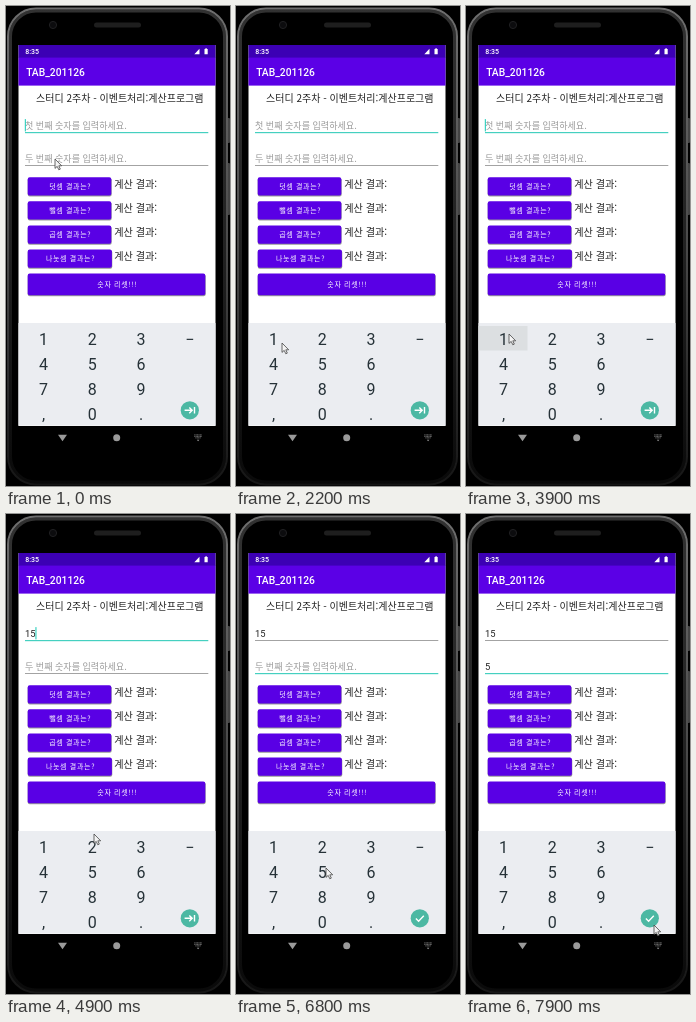
Recreate the animation shown at these times as an HTML page. Size 224 by 480 pixels, loop 8000 ms.

```html
<!DOCTYPE html>
<html lang="ko">
<head>
<meta charset="utf-8">
<title>Calculator demo</title>
<style>
  html, body { margin: 0; width: 100%; height: 100%; overflow: hidden; background: #000; }
  svg { display: block; width: 100%; height: 100%; }
  text { font-family: "Noto Sans CJK KR", "Noto Sans CJK", sans-serif; }
  .latin { font-family: Roboto, sans-serif; }
  .hint { font-size: 9.05px; fill: #9b9b9b; }
  .value { font-family: Roboto, sans-serif; font-size: 9.4px; fill: #222; }
  .result { font-size: 10.15px; fill: #222; }
  .label { font-size: 7px; letter-spacing: .095em; fill: #fff; text-anchor: middle; }
  .key { font-family: Roboto, sans-serif; font-size: 16px; fill: #263238; text-anchor: middle; }
  .icon { fill: none; stroke: #fff; stroke-width: 1.4; }
</style>
</head>
<body>
<svg id="stage" viewBox="0 0 224 480" xmlns="http://www.w3.org/2000/svg">
  <defs>
    <linearGradient id="rim" x1="0" y1="0" x2="0" y2="1">
      <stop offset="0" stop-color="#6e6e6e"/>
      <stop offset=".5" stop-color="#4a4a4a"/>
      <stop offset="1" stop-color="#161616"/>
    </linearGradient>
    <filter id="soft" x="-10%" y="-30%" width="120%" height="160%">
      <feGaussianBlur stdDeviation=".7"/>
    </filter>
  </defs>
  <rect width="224" height="480" fill="#000"/>
  <g fill="#444">
    <rect x="221" y="112" width="3" height="25" rx="1"/>
    <rect x="221" y="157" width="3" height="52" rx="1"/>
  </g>
  <g fill="none" stroke="url(#rim)">
    <rect x="2" y="2.5" width="219" height="476" rx="28" stroke-width="2"/>
    <rect x="4.5" y="5" width="214" height="471" rx="25.5" stroke-width="3" opacity=".45"/>
  </g>
  <circle cx="47" cy="19" r="3.6" fill="#0c0c0e" stroke="#202022"/>
  <rect x="88" y="16.5" width="47" height="5" rx="2.5" fill="#1e1e1e"/>

  <rect x="12.5" y="39" width="197" height="381" fill="#fff"/>
  <rect x="12.5" y="39" width="197" height="13" fill="#3c00b4"/>
  <text class="latin" x="19.2" y="48.2" font-size="7" font-weight="500" fill="#fff">8:35</text>
  <g fill="#fff">
    <path d="M193.5 42.8v5.4h-5.2z"/>
    <path d="M198.5 43h.9v-.8h1.4v.8h.9v5.2h-3.2z"/>
  </g>
  <rect x="12.5" y="51.6" width="197" height="28" fill="#5b00e6"/>
  <text class="latin" x="20.2" y="69.6" font-size="10.3" font-weight="500" fill="#fff">TAB_201126</text>
  <text x="113.8" y="95.6" font-size="10" fill="#222" text-anchor="middle">스터디 2주차 - 이벤트처리:계산프로그램</text>

  <g id="fields"></g>
  <g id="buttons"></g>

  <rect x="12.5" y="317" width="197" height="102.6" fill="#ebedf1"/>
  <rect id="press" width="49" height="24.5" fill="#dcdfe1"/>
  <g id="keys"></g>
  <circle id="ripple" cx="183.8" cy="404.3" r="13" fill="#d7dddf"/>
  <circle cx="183.8" cy="404.3" r="9.1" fill="#4cb8a3"/>
  <g transform="translate(183.8 404.3)">
    <path id="next" class="icon" d="M-5.2 0h7.5M-.5-2.9l2.9 2.9l-2.9 2.9M4.7-3.2v6.4"/>
    <path id="done" class="icon" d="M-3.9.2l2.7 2.7l5.2-5.4"/>
  </g>

  <g fill="#9a9a9a">
    <path d="M52 428.8h9L56.5 435.2z"/>
    <circle cx="110.7" cy="431.7" r="3.5"/>
    <path d="M190.8 433.8h2.6l-1.3 1.4z"/>
  </g>
  <path d="M188.3 428.9h7.6M188.3 430.4h7.6M189.4 431.9h5.4" stroke="#858585" stroke-width=".9" stroke-dasharray="1 .4"/>

  <path id="mouse" d="M0 0v9.4l2.2-2l1.6 3.4l1.5-.7l-1.5-3.3h2.9z" fill="#f4f4f4" stroke="#444" stroke-width=".8" stroke-linejoin="round"/>
</svg>
<script>
const LOOP = 8000, STEP = 100;
const $ = id => document.getElementById(id);

function add(parent, tag, attrs, text = "") {
  const el = document.createElementNS("http://www.w3.org/2000/svg", tag);
  for (const k in attrs) el.setAttribute(k, attrs[k]);
  el.textContent = text;
  return parent.appendChild(el);
}

function makeField(base, hintText) {
  const g = $("fields");
  return {
    hint: add(g, "text", { class: "hint", x: 19, y: base }, hintText),
    value: add(g, "text", { class: "value", x: 19, y: base + .3 }),
    line: add(g, "rect", { x: 19, y: base + 3.4, width: 183.3 }),
    caret: add(g, "rect", { y: base - 9.5, width: 1.1, height: 12.3, fill: "#2bcfbd" })
  };
}

function makeButton(y, width, height, text) {
  const g = $("buttons");
  add(g, "rect", { x: 21.7, y: y + 1, width: width + .6, height, rx: 2, opacity: .4, filter: "url(#soft)" });
  add(g, "rect", { x: 21.7, y, width: width + .2, height, rx: 2, fill: "#5900e5" });
  add(g, "text", { class: "label", x: 22.5 + width / 2, y: y + height / 2 + 2.6 }, text);
}

const first = makeField(122.6, "첫 번째 숫자를 입력하세요.");
const second = makeField(155.6, "두 번째 숫자를 입력하세요.");

["덧셈", "뺄셈", "곱셈", "나눗셈"].forEach((name, i) => {
  makeButton(171.2 + i * 24.1, i === 3 ? 84 : 83.4, 18.3, name + " 결과는?");
  add($("buttons"), "text", { class: "result", x: 108.2, y: 181.9 + i * 24.1 }, "계산 결과:");
});
makeButton(267.6, 177.4, 21.6, "숫자 리셋!!!");

["123−", "456", "789", ",0."].forEach((row, r) =>
  [...row].forEach((ch, c) =>
    add($("keys"), "text", { class: "key", x: 37.5 + c * 48.8, y: 338.9 + r * 25 }, ch)));

// Pointer stops: time, x, y
const path = [
  [0, 49, 153], [200, 57, 122], [400, 57, 122], [500, 57, 117], [1500, 57, 117],
  [1900, 48, 342], [2100, 46, 338], [2200, 46, 337], [2800, 44, 334], [3000, 44, 334],
  [3700, 43, 328], [4000, 43, 328], [4200, 88, 356], [4800, 88, 356], [4900, 88, 320],
  [5100, 118, 348], [5500, 184, 408], [5600, 184, 408], [5800, 183, 405], [6300, 183, 405],
  [6700, 92, 356], [6800, 90, 354], [7400, 90, 354], [7800, 188, 411], [8000, 188, 411]
];

function pointerAt(t) {
  const i = path.findIndex(p => p[0] > t);
  const [t0, x0, y0] = path[i - 1], [t1, x1, y1] = path[i];
  const k = (t - t0) / (t1 - t0);
  return [x0 + (x1 - x0) * k, y0 + (y1 - y0) * k];
}

const show = (el, on) => el.setAttribute("visibility", on ? "visible" : "hidden");

function drawField(f, text, focused, blinkOn) {
  f.value.textContent = text;
  show(f.hint, !text);
  f.line.setAttribute("height", focused ? 1.2 : .9);
  f.line.setAttribute("fill", focused ? "#45d0c0" : "#999");
  f.caret.setAttribute("x", 18.8 + text.length * 5.3);
  show(f.caret, focused && blinkOn);
}

// Each edit or focus change restarts the caret's blink.
const blinkStarts = [-300, 4000, 4700, 6200, 7400];

function draw(time) {
  const t = Math.floor((time % LOOP) / STEP) * STEP;
  const start = blinkStarts.filter(s => s <= t).pop();
  const blinkOn = (t - start) % 1000 < 500;
  const onSecond = t >= 6200;

  drawField(first, t < 4000 ? "" : t < 4700 ? "1" : "15", !onSecond, blinkOn);
  drawField(second, t < 7400 ? "" : "5", onSecond, blinkOn);

  const one = t >= 3900 && t < 4000;
  const five = t >= 4500 && t < 4700 || t >= 7200 && t < 7400;
  $("press").setAttribute("x", one ? 12.5 : 61.5);
  $("press").setAttribute("y", one ? 320 : 345);
  show($("press"), one || five);
  show($("ripple"), t >= 6000 && t < 6200);
  show($("next"), !onSecond);
  show($("done"), onSecond);
  $("mouse").setAttribute("transform", `translate(${pointerAt(t)})`);
}

const begin = performance.now();
function tick() {
  draw(performance.now() - begin);
  requestAnimationFrame(tick);
}
tick();
</script>
</body>
</html>
```
